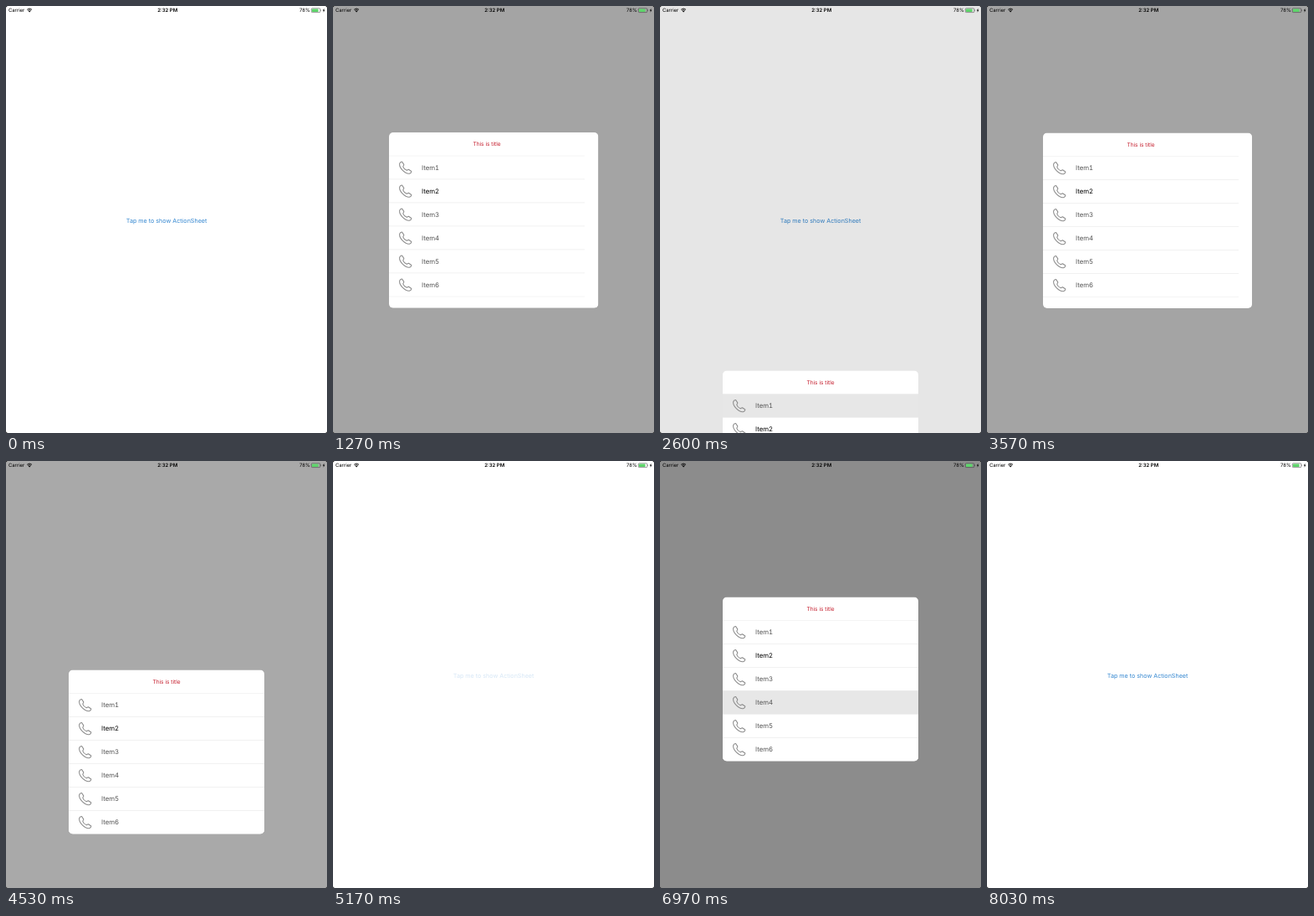
These frames come from a looping animation (384x510 px, 8.23 s). An HTML page:

```html
<!DOCTYPE html>
<html lang="en">
<head>
<meta charset="utf-8">
<title>Action sheet</title>
<style>
  html, body { margin: 0; width: 100%; height: 100%; overflow: hidden; background: #000; }
  svg { display: block; width: 100vw; height: 100vh; font-family: Inter, "Noto Sans", sans-serif; }
  text { text-rendering: geometricPrecision; }
  .status { font-size: 5.95px; }
  .item { font-size: 7.8px; font-variant-numeric: tabular-nums; }
</style>
</head>
<body>
<svg viewBox="0 0 384 510">
  <defs>
    <clipPath id="screen"><rect width="384" height="510" rx="2.5"/></clipPath>
    <clipPath id="sheetClip"><rect id="clipRect" rx="5"/></clipPath>
    <path id="phone" fill="none" stroke="#8c8c8c" stroke-width="1.05" stroke-linejoin="round"
      d="M.8 3.3C1.2 1.8 2.6.7 3.8.8L6 4.2C6.3 5 5 5.8 5 6.6C5.6 8.4 7.6 10.4 9.4 11C10.2 11 11 9.8 11.7 10.1L15 12.3C15.3 13.3 14 14.8 12.6 15C7.4 15.4.4 8.4.8 3.3Z"/>
  </defs>
  <g clip-path="url(#screen)">
    <rect width="384" height="510" fill="#fff"/>
    <text id="link" x="192.1" y="258.7" text-anchor="middle" font-size="7.15" fill="#2f84cf">Tap me to show ActionSheet</text>
    <rect id="dim" width="384" height="510"/>
    <g class="status">
      <text x="2.9" y="7.2">Carrier</text>
      <path d="M25.2 4.3Q28.1 1.8 31 4.3M26.3 5.5Q28.1 4 29.9 5.5" fill="none" stroke="#000" stroke-width=".9"/>
      <path d="M28.1 7.4L26.9 6.2Q28.1 5.3 29.3 6.2Z"/>
      <text x="193.2" y="7.2" text-anchor="middle" font-weight="600" font-size="6">2:32 PM</text>
      <text x="363.8" y="7.2" text-anchor="end">78%</text>
      <rect x="365.3" y="2.8" width="10.6" height="4.8" rx="1" fill="none" stroke="#333" stroke-width=".5"/>
      <rect x="366" y="3.5" width="7.6" height="3.4" rx=".4" fill="#5fd56c"/>
      <path d="M376.4 4.3q1 .9 0 1.8zM380.7 2.7L378.7 5.5H380L379.5 7.7L381.5 4.8H380.2Z"/>
    </g>
    <g id="sheet">
      <g clip-path="url(#sheetClip)">
        <rect id="panel" fill="#fff"/>
        <text x="117" y="16.4" text-anchor="middle" font-size="6.55" fill="#c51f2e">This is title</text>
        <g id="rows"></g>
      </g>
    </g>
  </g>
</svg>
<script>
const LOOP = 8230, WIDTH = 234, HEIGHT = 196, ROW = 28;
const CENTER_X = 192, CENTER_Y = 256, SCREEN_H = 510, DIM = 0.457;

// Times in ms; row is the item selected at "select".
const rounds = [
  { press: 930, release: 1030, open: 1063, select: 2000, close: 2389, row: 0 },
  { press: 3130, release: 3330, open: 3364, select: Infinity, close: 4459, row: -1 },
  { press: 5170, release: 5670, open: 5700, select: 6500, close: 6959, row: 3 }
];

const $ = id => document.getElementById(id);
const set = (el, attrs) => {
  for (const name in attrs) el.setAttribute(name, attrs[name]);
};

$('rows').innerHTML = Array.from({ length: 6 }, (_, i) => `
  <g transform="translate(0 ${ROW * (i + 1)})">
    <rect class="fill" width="${WIDTH}" height="${ROW}" fill="#fff"/>
    <use href="#phone" x="11.8" y="6.2"/>
    <text class="item" x="39" y="16.8" fill="${i === 1 ? '#000' : '#555'}">Item${i + 1}</text>
    <path d="M0 0H${WIDTH}M0 ${ROW}H${WIDTH}" stroke="#e8e8e8" stroke-width=".5"/>
  </g>`).join('');
const fills = document.querySelectorAll('.fill');

// Critically damped approach from 0 to 1.
function settle(ms) {
  const x = Math.max(0, ms) * 0.01375;
  return 1 - (1 + x) * Math.exp(-x);
}

// Underdamped spring from 0 to 1 with damping ratio 0.6.
function bounce(ms) {
  const x = Math.max(0, ms) * 0.0158;
  return 1 - Math.exp(-0.6 * x) * (Math.cos(0.8 * x) + 0.75 * Math.sin(0.8 * x));
}

function linkOpacity(t, { press, release }) {
  if (t < press) return 1;
  return 0.2 + 0.8 * Math.min(1, Math.max(0, (t - release) / 300));
}

function draw(t) {
  const round = rounds.findLast(r => t >= r.press) || rounds[0];
  const scale = bounce(t - round.open);
  const leaving = settle(t - round.close);
  const width = WIDTH * scale, height = HEIGHT * scale;
  const x = CENTER_X - width / 2;
  const y = CENTER_Y - height / 2 + leaving * (SCREEN_H - CENTER_Y + HEIGHT / 2);

  set($('link'), { opacity: linkOpacity(t, round) });
  set($('dim'), { opacity: DIM * settle(t - round.open) * (1 - leaving) });
  set($('sheet'), {
    // Positions snap to half pixels, as on a 2x display.
    transform: `translate(${Math.round(x * 2) / 2} ${Math.round(y * 2) / 2})`,
    visibility: t > round.open && t < round.close + 600 ? 'visible' : 'hidden'
  });
  set($('clipRect'), { width, height });
  set($('panel'), { width, height });
  fills.forEach((fill, i) =>
    set(fill, { fill: i === round.row && t >= round.select ? '#e7e7e7' : '#fff' }));
}

function tick() {
  draw(performance.now() % LOOP);
  requestAnimationFrame(tick);
}
tick();
</script>
</body>
</html>
```
